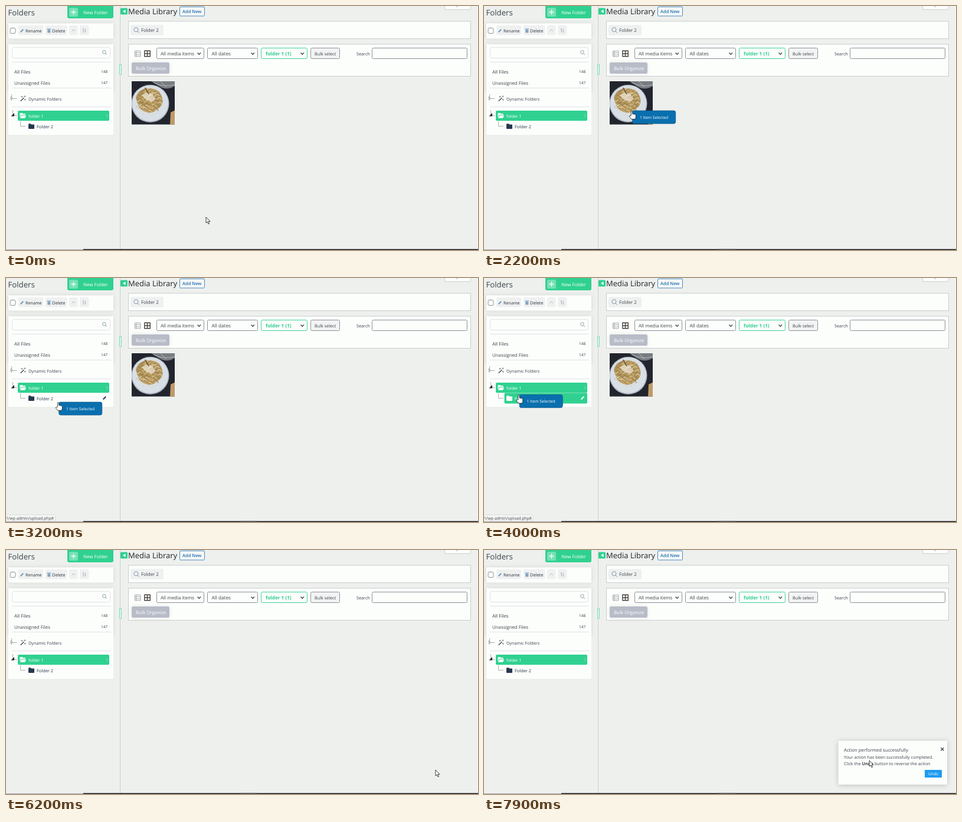
An HTML page for the animation above (8 s loop, 800 by 415 pixels).

```html
<!DOCTYPE html>
<html lang="en">
<head>
<meta charset="utf-8">
<title>Media Library folders</title>
<style>
  html, body { margin: 0; width: 100%; height: 100%; overflow: hidden; background: #eef0ee; }
  svg { display: block; font: 8px "Open Sans", sans-serif; fill: #3c434a; text-rendering: geometricPrecision; }
  .panel { fill: #fcfefc; }
  .boxed { fill: #fcfefc; stroke: #c9cdcb; }
  .field { fill: #fcfefc; stroke: #8c9195; }
  .chip { fill: #eff1f1; }
  .green { fill: #30d190; }
  .white { fill: #fff; }
  .line { fill: none; stroke: #dfe3e2; }
  .tree { fill: none; stroke: #a9afae; }
  .ink { fill: none; stroke: #3c434a; stroke-width: 1.3; }
  .thin { stroke-width: .7; }
  .lens { fill: none; stroke: #8397a8; }
  .cursor { fill: #fff; stroke: #111; stroke-width: .8; stroke-linejoin: round; }
  .soft { filter: drop-shadow(0 0 3px #0000001a); }
  .lift { filter: drop-shadow(0 1px 4px #0003); }
</style>
</head>
<body>
<svg width="800" height="415" viewBox="0 0 800 415">
  <defs>
    <path id="folder" d="M0 1.3Q0 .3 1 .3H4L5.2 1.6H9Q10 1.6 10 2.6V8Q10 9 9 9H1Q0 9 0 8Z"/>
    <path id="pencil" d="M0 6.5.6 4.4 4.5.5 6 2 2.1 5.9Z"/>
    <path id="chevron" class="ink" d="M0 0 2.8 2.8 5.6 0"/>
    <clipPath id="frame"><path d="M213 128h73v73.500h-73z"/></clipPath>
  </defs>

  <!-- Sidebar -->
  <path stroke="#cbcfcd" d="M193.500 0V414"/>
  <text x="3.500" y="16.300" font-size="13.200">Folders</text>
  <rect class="green" x="104" y="-4" width="78" height="25" rx="3"/>
  <rect x="107" y="3" width="15" height="15" rx="2" fill="#74e1b5"/>
  <path stroke="#fff" stroke-width="1.400" d="M110.500 10.500h8M114.500 6.500v8"/>
  <text class="white" x="131" y="13.500" font-size="7.900">New Folder</text>

  <g class="panel">
    <g class="soft">
      <rect x="4" y="29.500" width="178" height="26"/>
      <rect x="4" y="65" width="178" height="80"/>
    </g>
    <rect x="4" y="65" width="178" height="154"/>
  </g>
  <rect class="field" x="7" y="37.500" width="9" height="9" rx="2"/>
  <g class="chip">
    <rect x="21" y="33" width="42" height="16.500" rx="2"/>
    <rect x="67" y="33" width="36.500" height="16.500" rx="2"/>
    <rect x="107" y="33" width="14.500" height="16.500" rx="2"/>
    <rect x="125" y="33" width="15.500" height="16.500" rx="2"/>
  </g>
  <use href="#pencil" x="24" y="38.500" fill="#6f9cc4"/>
  <path fill="#7fa3c4" d="M69.500 38.500h6.500v1.200h-6.500zM70.300 40.300h5V45.500h-5z"/>
  <g font-size="7.200" font-weight="500" fill="#2c3338">
    <text x="33" y="44.500">Rename</text>
    <text x="78" y="44.500" font-size="7.400">Delete</text>
  </g>
  <path class="lens thin" d="M111.500 42.800l2.800-2.600 2.800 2.600M131.300 45v-6.500l-1.500 1.500M134.300 38.500v6.500l1.500-1.500"/>

  <rect class="line" x="10.500" y="70.500" width="166" height="18" rx="2.500"/>
  <path class="lens" d="M169.200 78.500a2.800 2.800 0 1 0-5.600 0a2.800 2.800 0 1 0 5.600 0M168.500 80.600l2.500 2.500"/>
  <path class="line" d="M10 95.500H178M10 139.500H178M10 171.500H178"/>
  <text x="14" y="114.500">All Files</text>
  <text x="14" y="133.500" font-size="7.850">Unassigned Files</text>
  <g font-size="6.600"><text x="161" y="113.500">148</text><text x="161" y="132.500">147</text></g>

  <path class="tree" d="M9.500 150V161M9.500 157.500H18.500M8 154l3.500 2.500L8 159.500zM11.500 177V186.500H18.500M24.500 196V204.500H33"/>
  <path fill="#222" d="M8.500 187.500h5.500V182z"/>
  <path class="ink" d="M24.800 161.800 30.500 156"/>
  <path class="ink thin" d="M27 153v2.500M25.800 154.200h2.500M32 152.500v2.500M30.800 153.700h2.500M32.300 158v2.500M31 159.200h2.500"/>
  <text x="38" y="161" font-size="7.250">Dynamic Folders</text>

  <rect class="green" x="20" y="178" width="155" height="17.300" rx="2"/>
  <path class="white" d="M23.500 183q0-1 1-1h3l1.200 1.300h3.300q1 0 1 1v1h-7l-2.500 4zM26.300 186.200h8L32 190.800h-8.200z"/>
  <text class="white" x="38" y="189.500" font-size="7.100">folder 1</text>
  <text x="169.500" y="188.500" font-size="5.500" fill="#d5f6e8">1</text>

  <rect id="row" x="34.500" y="195.500" width="140.500" height="18" rx="2"/>
  <g id="child">
    <use href="#folder" x="38" y="200"/>
    <text x="52" y="207.500" font-size="7.400">Folder 2</text>
    <use id="edit" href="#pencil" x="164" y="200.500"/>
  </g>

  <rect class="green" x="194" y="3.500" width="12" height="11" rx="1.500"/>
  <path class="white" d="M202.500 6v6l-4.500-3z"/>
  <path fill="#e6f3ed" stroke="#7bdab6" d="M192.500 99.500h3v17h-3z"/>

  <!-- Main area -->
  <text x="207" y="13.500" font-size="13" fill="#1d2327">Media Library</text>
  <rect x="294.500" y="1.500" width="42" height="15.500" rx="1.500" fill="#f6f8f8" stroke="#4a8ac0"/>
  <text x="299" y="12.300" font-size="7.500" font-weight="600" fill="#2271b1">Add New</text>
  <rect class="boxed" x="743.500" y="-9.500" width="44" height="15.500" rx="2"/>
  <text x="752" y="0" font-size="7.500">Help</text>

  <rect class="boxed" x="207.500" y="26" width="580" height="29.500"/>
  <rect class="chip" x="211" y="32" width="56" height="18" rx="2"/>
  <path class="lens" d="M224 40.200a3.600 3.600 0 1 0-7.200 0a3.600 3.600 0 1 0 7.200 0M223 42.800l2.800 2.800"/>
  <text x="229" y="44" font-size="7.900">Folder 2</text>

  <rect class="boxed" x="207.500" y="65" width="580" height="54.500"/>
  <path fill="none" stroke="#a3a8ab" d="M218.500 76.500h9.500v9.500h-9.500zM218.500 79.500h9.500M218.500 83h9.500M221 76.500v9.500"/>
  <path fill="none" stroke="#443f3c" stroke-width="1.400" d="M234.800 76.200h9.500v9.500h-9.500zM239.500 76v10M234.500 81h10"/>
  <g class="field">
    <rect x="255.500" y="71.500" width="80" height="18" rx="2"/>
    <rect x="341.500" y="71.500" width="85" height="18" rx="2"/>
    <rect x="432.500" y="71.500" width="78" height="18" rx="2" stroke="#3fcf96"/>
    <rect x="516.500" y="71.500" width="49" height="18" rx="2" fill="#f2f4f4"/>
    <rect x="620.500" y="71.500" width="161" height="18" rx="2"/>
  </g>
  <use href="#chevron" x="324.500" y="79.500"/>
  <use href="#chevron" x="415.500" y="79.500"/>
  <use href="#chevron" x="499.500" y="79.500"/>
  <text x="262" y="83.700">All media items</text>
  <text x="348.500" y="83.700" font-size="8.200">All dates</text>
  <text x="440" y="83.700" font-size="8.200" font-weight="700" fill="#2bcf8d">folder 1 (1)</text>
  <text x="523" y="83.700" font-size="7.250">Bulk select</text>
  <text x="594" y="83.700" font-size="7.250">Search</text>
  <rect class="soft" x="213" y="96" width="64" height="19" rx="2.500" fill="#b7bcc7"/>
  <text class="white" x="220" y="108.500" font-size="7.900">Bulk Organize</text>

  <g id="photo" clip-path="url(#frame)">
    <path fill="#22252d" d="M213 128h73v74h-73z"/>
    <path fill="#777c80" d="M246 128h40v8q-12 8-24 2z"/>
    <path fill="none" stroke="#b4b9bb" d="M250 130q16 9 36 4M262 128l10 10"/>
    <path fill="#c09a67" d="M279 181l8-4v26h-9z"/>
    <circle cx="244.500" cy="166" r="32" fill="#aeb8c2"/>
    <circle cx="244.500" cy="165.500" r="30.500" fill="#d8dfe5"/>
    <path fill="#b0935a" d="M220 156q4-15 21-16 18 0 23 14 5 14-7 21-7 8-18 6-16-5-19-25z"/>
    <g id="pasta" fill="none"/>
    <path fill="#f3efe4" d="M230 152l9-5 9 3 6 8-8 5-9-4z" opacity=".65"/>
    <path fill="none" stroke="#5e4330" stroke-width="1.500" d="M236 139l6 11"/>
  </g>

  <path stroke="#fafbfa" d="M799.500 0V413"/>
  <path stroke="#a5a8a6" d="M0 414.500H131"/>
  <path stroke="#151515" stroke-width="1.500" d="M131 414.250H800"/>
  <path id="smudge" stroke="#4b4d4c" stroke-width="1.500" d="M397 414.250H426"/>

  <g id="status">
    <path fill="#f3f5f3" stroke="#d6dad7" stroke-width=".8" d="M-1 402.500H81.500q2 0 2 2V413H-1z"/>
    <text x="0" y="410.700" font-size="6.750">1/wp-admin/upload.php#</text>
  </g>

  <g id="toast">
    <rect class="panel lift" x="600.500" y="324.500" width="184.500" height="74.500" rx="1"/>
    <text x="610" y="342.700" font-size="7.780">Action performed successfully</text>
    <text x="610" y="355.300" font-size="7.200">Your action has been successfully completed.</text>
    <text x="610" y="366" font-size="7.300">Click the <tspan font-weight="700">Undo</tspan> button to reverse the action</text>
    <path class="ink" d="M774.300 336.300l5 5M779.300 336.300l-5 5"/>
    <rect x="747" y="374" width="29" height="13" rx="1" fill="#1d9bf0"/>
    <text class="white" x="753" y="383" font-size="6.700">Undo</text>
  </g>

  <g id="pointer">
    <g id="badge">
      <rect x="1.200" y="-.4" width="73" height="22" rx="3" fill="#0a6fae" stroke="#07598d" stroke-width=".8"/>
      <text class="white" x="13.500" y="13" font-size="6.750">1 Item Selected</text>
    </g>
    <path id="arrow" class="cursor" d="M0 0V10L2.300 8 4 11.800 5.600 11.100 4 7.400H7Z"/>
    <path id="hand" class="cursor" d="M-1.200 8V1.200a1.200 1.200 0 0 1 2.400 0V5l1.600.2 1.800.3 1.400.6c.6.3.8 1 .8 1.800V10c0 2-1 3-1.200 4H-.8C-1 13-2.500 12-4 9.500c-.8-1.200.8-2 1.600-1.200Z"/>
  </g>
</svg>
<script>
const DURATION = 8000, STEP = 100;
const $ = id => document.getElementById(id);
const show = (id, on) => { $(id).style.display = on ? "" : "none"; };

// Pointer path: time, x, y
const path = [
  [0, 339, 359], [100, 339, 359], [900, 273, 207], [1400, 250.5, 178.5], [2400, 250.5, 178.5],
  [3000, 100, 213], [3200, 88.5, 211.5], [3400, 88.5, 211.5], [3800, 59, 199], [5200, 59, 199],
  [5400, 474, 226], [5900, 650, 327], [6200, 728, 374], [6600, 737, 385],
  [7400, 737, 385], [7900, 653, 358], [8000, 653, 358]
];

function pointerAt(t) {
  const i = path.findIndex(key => key[0] > t);
  const [t0, x0, y0] = path[i - 1], [t1, x1, y1] = path[i];
  const k = (t - t0) / (t1 - t0);
  return [x0 + (x1 - x0) * k, y0 + (y1 - y0) * k];
}

// Loose strands on the plate
const tones = ["#e6d3a0", "#8f7440", "#f4ead0", "#cdb478"];
$("pasta").innerHTML = Array.from({ length: 44 }, (_, i) => {
  const a = i * 2.4, r = 3 * Math.sqrt(i);
  const x = 242 + r * Math.cos(a), y = 161 + r * Math.sin(a);
  return `<path stroke="${tones[i % 4]}" d="M${x - 4} ${y}q${4 + 3 * Math.sin(a)} ${-7 * Math.cos(a)} 8 ${6 * Math.sin(a)}"/>`;
}).join("");

function draw(now) {
  const t = Math.floor(now % DURATION / STEP) * STEP;
  const within = (from, to) => t >= from && t < to;
  const over = within(3500, 5000), hover = within(5000, 5600);

  $("pointer").setAttribute("transform", `translate(${pointerAt(t)})`);
  show("hand", within(1000, 5300));
  show("arrow", !within(1000, 5300));
  show("badge", within(1700, 5000));
  show("smudge", t >= 1600);
  show("photo", t < 6200);
  show("status", within(3000, 5700));
  show("edit", within(3000, 5600));
  $("row").style.fill = over ? "#30d190" : hover ? "#eef5f9" : "none";
  $("child").style.fill = over ? "#fff" : "#26384c";
  $("toast").style.opacity = Math.min(1, Math.max(0, (t - 7000) / 300));
  requestAnimationFrame(draw);
}
requestAnimationFrame(draw);
</script>
</body>
</html>
```
